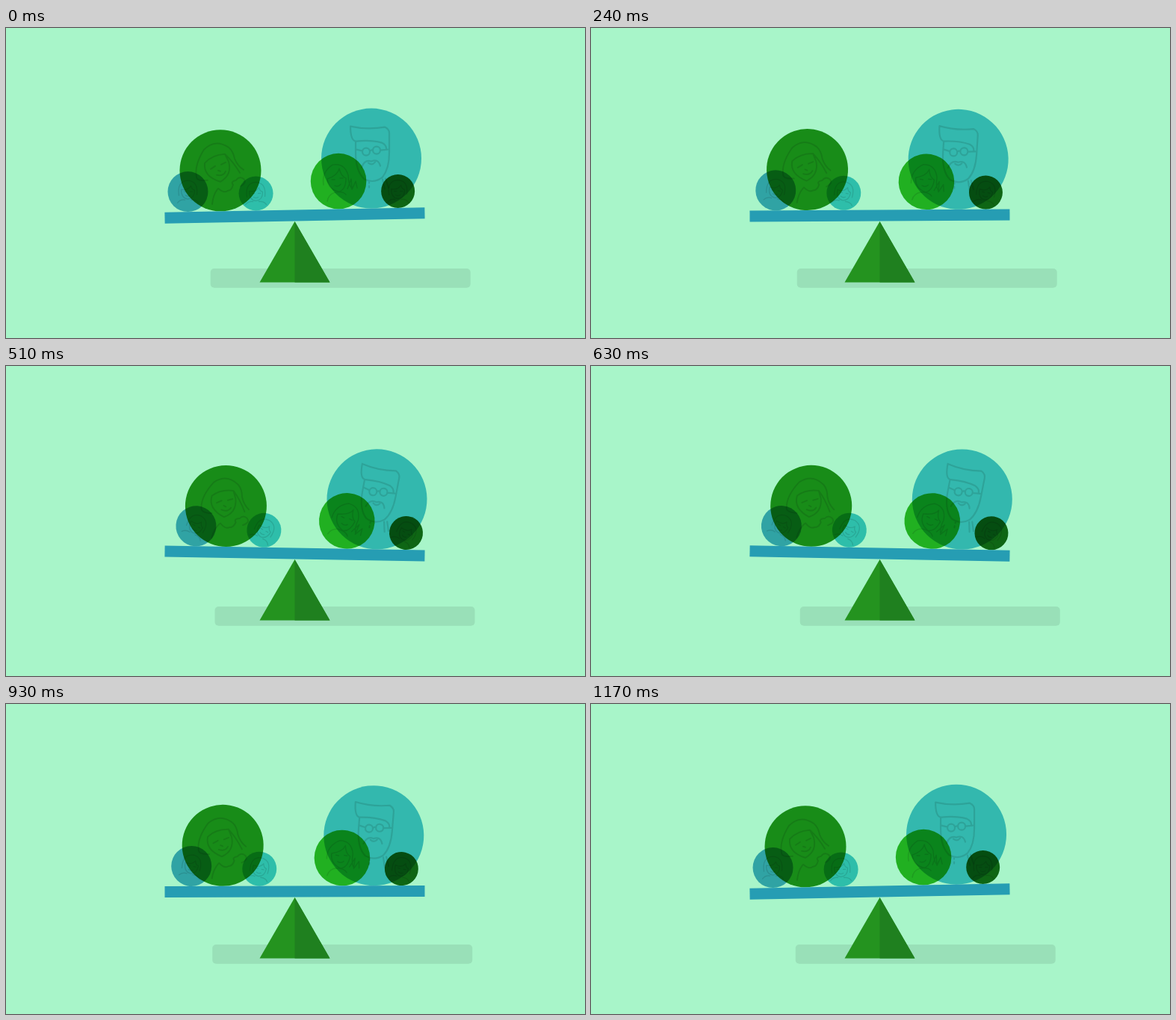
Animation, 775 px wide and 415 px high, one loop 1200 ms. Source, as an HTML page with a canvas:

```html
<!DOCTYPE html>
<html lang="en">
<head>
<meta charset="utf-8">
<title>Balance</title>
<style>
html, body { margin: 0; width: 100%; height: 100%; overflow: hidden; background: #a8f5c9; }
canvas { display: block; }
</style>
</head>
<body>
<canvas id="stage" width="775" height="415"></canvas>
<script>
const ctx = document.getElementById('stage').getContext('2d');
const LOOP = 1200, STEP = 30, RAD = Math.PI / 180;
const TILT = 1.05 * RAD;
const PIVOT = { x: 386.5, y: 251 };
const BEAM = { w: 348, h: 15 };

// Line drawings, relative to the centre of their ball
const man = new Path2D(`
  M-28 -43 Q-6 -38 18 -42 Q24 -39 24 -34 L24 -8 Q24 14 15 25 Q4 34 -9 28 Q-21 18 -21 -8 L-21 -23 Q-28 -24 -28 -43
  M-20 -23 Q0 -25 14 -21 Q20 -18 20 -13 M-20 -12 L-12 -10 M-2 -10 Q0 -12 2 -11 M12 -11 L22 -12
  M-2 -9 a5 5 0 1 0 -10 0 a5 5 0 1 0 10 0 M12 -11 a5 5 0 1 0 -10 0 a5 5 0 1 0 10 0
  M-13 12 Q-9 1 0 4 Q9 0 12 10 M-4 6 Q1 10 5 5 M-3 31 v2 M-3 37 v2 M15 28 L18 41 M19 27 L23 39`);

const woman = new Path2D(`
  M-17 13 Q-32 15 -32 8 Q-35 -7 -22 -28 Q-7 -43 11 -31 Q17 -26 19 -16 Q23 -6 31 -1
  M6 -22 Q-11 -21 -21 -10 Q-23 8 0 15 Q16 6 11 -12 L6 -22 Q17 -12 26 3
  M-13 -2 l6 -4 M1 -8 l6 -3 M-3 0 l3 1 M-5 6 Q4 8 7 1
  M-3 24 Q5 31 10 27 Q15 27 17 19 Q13 15 21 13 Q25 7 31 11 M31 11 Q36 16 27 21 M-11 45 Q-10 33 -4 25`);

const girl = new Path2D(`
  M-20 5 Q-23 -12 -8 -22 Q8 -25 13 -8 Q13 4 18 10 M-15 -3 Q-1 -8 1 -17 Q3 -7 10 -4 Q10 11 1 14 Q-14 11 -15 -3
  M-9 -2 h4 M2 -4 h4 M-5 6 Q0 8 3 4 M12 10 L17 -3 L18 11 L23 0 L25 9 M-15 27 Q-14 18 -5 15 Q6 13 10 18`);

const child = new Path2D(`
  M-12 5 Q-15 -14 0 -15 Q14 -14 12 4 M-9 -3 Q0 -1 4 -8 Q5 -3 9 -2 Q9 9 0 10 Q-9 9 -9 -3
  M-5 0 h3 M3 0 h3 M-3 5 Q0 7 3 5 M-14 15 Q-10 10 -4 11 M4 11 Q11 10 14 15`);

// x: start along the beam, shift: travel along it, roll: turn in degrees
const balls = [
  { x: 288.1, r: 54.5, color: 'rgb(36,146,30)', shift: 5.5, roll: 9, art: woman, line: 2 },
  { x: 244.1, r: 27, color: 'rgb(73,170,208)', shift: 10.2, roll: 26, art: child, line: 1.3 },
  { x: 335.1, r: 23, color: 'rgb(70,198,216)', shift: 10.2, roll: 28, art: child, line: 1.3 },
  { x: 490.4, r: 67, color: 'rgb(77,192,221)', shift: 5.1, roll: 9, art: man, line: 2.2 },
  { x: 445.9, r: 37.3, color: 'rgb(49,183,41)', shift: 10.1, roll: 26, art: girl, line: 1.5 },
  { x: 525.2, r: 22.5, color: 'rgb(21,106,25)', shift: 10.3, roll: 30, art: child, line: 1.4 }
];

// Cubic Bezier (.42, 0, .58, 1)
function easeInOut(x) {
  let lo = 0, hi = 1;
  for (let i = 0; i < 24; i++) {
    const t = (lo + hi) / 2, u = 1 - t;
    if (1.26 * u * u * t + 1.74 * u * t * t + t * t * t < x) lo = t; else hi = t;
  }
  return lo * lo * (3 - 2 * lo);
}

function polygon(color, ...points) {
  ctx.fillStyle = color;
  ctx.beginPath();
  points.forEach(([x, y]) => ctx.lineTo(x, y));
  ctx.fill();
}

function drawBall(ball, p) {
  ctx.save();
  ctx.globalCompositeOperation = 'multiply';
  ctx.translate(ball.x + ball.shift * p - PIVOT.x, -BEAM.h / 2 - ball.r);
  ctx.rotate(ball.roll * RAD * p + TILT);
  ctx.fillStyle = ball.color;
  ctx.beginPath();
  ctx.arc(0, 0, ball.r, 0, Math.PI * 2);
  ctx.fill();
  ctx.clip();
  ctx.strokeStyle = 'rgba(0,30,20,.13)';
  ctx.lineWidth = ball.line;
  ctx.lineCap = ctx.lineJoin = 'round';
  ctx.stroke(ball.art);
  ctx.restore();
}

function draw(time) {
  const phase = time / (LOOP / 2);
  const p = easeInOut(phase < 1 ? phase : 2 - phase);

  ctx.fillStyle = '#a8f5c9';
  ctx.fillRect(0, 0, 775, 415);

  ctx.fillStyle = '#99e0b8';
  ctx.beginPath();
  ctx.roundRect(273.7 + 6.1 * p, 322, 348, 25.8, 5);
  ctx.fill();

  ctx.save();
  ctx.translate(PIVOT.x, PIVOT.y);
  ctx.rotate(TILT * (2 * p - 1));
  balls.forEach(ball => drawBall(ball, p));
  ctx.fillStyle = '#269db3';
  ctx.fillRect(-BEAM.w / 2, -BEAM.h / 2, BEAM.w, BEAM.h);
  ctx.restore();

  polygon('#24931f', [386.5, 259], [433.5, 340.5], [339.5, 340.5]);
  polygon('#1f801f', [386.5, 259], [433.5, 340.5], [386.5, 340.5]);
}

const start = performance.now();
function tick() {
  const elapsed = (performance.now() - start) % LOOP;
  draw(Math.floor(elapsed / STEP) * STEP);
  requestAnimationFrame(tick);
}
tick();
</script>
</body>
</html>
```
